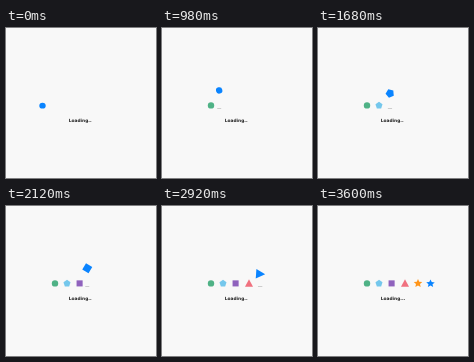
These frames come from a looping animation (150 by 150 pixels, 3620 ms). An HTML page:

```html
<!DOCTYPE html>
<html lang="en">
<head>
<meta charset="utf-8">
<title>Loading</title>
<style>
  html, body { margin: 0; width: 100%; height: 100%; overflow: hidden; background: #f8f8f8; }
  svg { display: block; width: 100vw; height: 100vh; }
  text { font: bold 4.35px "DejaVu Sans", sans-serif; fill: #222; white-space: pre; }
</style>
</head>
<body>
<svg viewBox="0 0 150 150">
  <rect id="shadow" y="80" height="0.8" fill="#c4c4c4"/>
  <g id="trail"></g>
  <path id="jumper" fill="#0a84ff"/>
  <text x="62.8" y="93.8" text-rendering="geometricPrecision">Loading..<tspan id="dot">.</tspan></text>
</svg>
<script>
  const LOOP = 3620, HOP = 600, STEP = 20;
  const START = 36.5, STRIDE = 76 / 6, GROUND = 77.4, RISE = 15.2;
  const $ = id => document.getElementById(id);

  // Regular polygon or star, first corner pointing up unless turned.
  function polygon(n, r, inner = 0, turn = 0) {
    const count = inner ? n * 2 : n;
    const points = Array.from({ length: count }, (_, i) => {
      const a = turn - Math.PI / 2 + i * 2 * Math.PI / count;
      const d = inner && i % 2 ? inner : r;
      return (d * Math.cos(a)).toFixed(2) + ' ' + (d * Math.sin(a)).toFixed(2);
    });
    return 'M' + points.join('L') + 'Z';
  }

  const circle = 'M-3.2 0a3.2 3.2 0 1 0 6.4 0a3.2 3.2 0 1 0 -6.4 0Z';
  const star = polygon(5, 4.5, 2.1);
  const shapes = [
    { d: circle, color: '#4fb286', x: 49, sides: 1, grow: 1 },
    { d: polygon(5, 3.7), color: '#74c7ec', x: 61, sides: 5, grow: 1.2 },
    { d: polygon(4, 4.3, 0, Math.PI / 4), color: '#8f62bd', x: 73.6, sides: 4, grow: 1.2 },
    { d: 'M0 -4.2L4 3.4L-4 3.4Z', color: '#f0717f', x: 87, sides: 3, grow: 1.2 },
    { d: star, color: '#ff9519', x: 100, sides: 5, grow: 1 }
  ];

  for (const s of shapes) {
    s.el = document.createElementNS('http://www.w3.org/2000/svg', 'path');
    s.el.setAttribute('d', s.d);
    s.el.setAttribute('fill', s.color);
    s.el.setAttribute('transform', `translate(${s.x} ${GROUND})`);
    $('trail').append(s.el);
  }

  // Quick lift-off, a floating top and a softer drop.
  function lift(t) {
    const u = 2 * t - 1;
    return 1 - Math.abs(u) ** (u < 0 ? 5 : 3.1);
  }

  function draw(ms) {
    const hop = Math.min(5, Math.floor(ms / HOP));
    const t = Math.min(1, ms / HOP - hop);
    const x = START + STRIDE * (hop + t);
    const height = lift(t);
    const form = shapes[Math.max(0, hop - 1)];
    const angle = 360 / form.sides * t ** 1.7;
    const scale = 1 + (form.grow - 1) * Math.min(1, height * 2);
    const squash = 1 - 0.08 * Math.max(0, 1 - height * 4);
    const y = GROUND - RISE * height + 3.2 * (1 - squash);

    shapes.forEach((s, i) => s.el.setAttribute('visibility', i < hop ? 'visible' : 'hidden'));
    $('jumper').setAttribute('d', form.d);
    $('jumper').setAttribute('transform',
      `translate(${x} ${y}) scale(1 ${squash}) rotate(${angle}) scale(${scale})`);

    const width = 5 - height;
    $('shadow').setAttribute('x', x - width / 2);
    $('shadow').setAttribute('width', width);
    $('shadow').setAttribute('opacity', Math.min(1, height * 2));

    const landed = ms >= HOP && ms % HOP < 200;
    $('dot').setAttribute('visibility', landed ? 'visible' : 'hidden');
  }

  const origin = performance.now();
  function tick() {
    const ms = (performance.now() - origin) % LOOP;
    draw(Math.floor(ms / STEP) * STEP);
    requestAnimationFrame(tick);
  }
  draw(0);
  requestAnimationFrame(tick);
</script>
</body>
</html>
```
